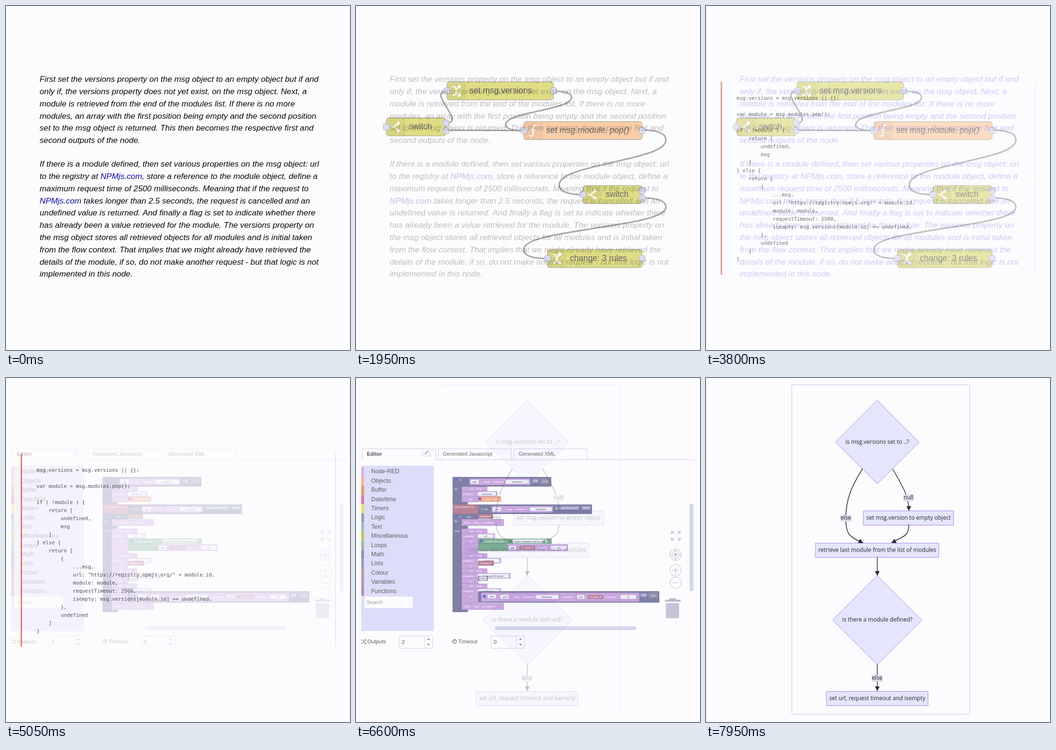
An HTML page with a canvas that plays this animation: 726 by 726 pixels, repeating every 8000 ms.

```html
<!DOCTYPE html>
<html lang="en">
<head>
<meta charset="utf-8">
<title>Five views of one node</title>
<style>
html, body { margin: 0; width: 100%; height: 100%; overflow: hidden; background: #fcfcfe; }
canvas { display: block; width: 726px; height: 726px; }
</style>
</head>
<body>
<canvas id="stage" width="726" height="726"></canvas>
<script>
const SIZE = 726, LOOP = 8000;
const SANS = '"Liberation Sans", Arial, sans-serif';
const MONO = '"DejaVu Sans Mono", monospace';
const HUMAN = '"Open Sans", "Noto Sans", sans-serif';
let c;

function layer(draw) {
  const cv = document.createElement('canvas');
  cv.width = cv.height = SIZE;
  c = cv.getContext('2d');
  c.lineCap = c.lineJoin = 'round';
  draw();
  return cv;
}
function text(s, x, y, font, color, align = 'left', base = 'middle') {
  c.font = font;
  c.fillStyle = color;
  c.textAlign = align;
  c.textBaseline = base;
  c.fillText(s, x, y);
}
function box(x, y, w, h, fill, stroke, r = 0, lw = 1) {
  c.beginPath();
  c.roundRect(x, y, w, h, r);
  if (fill) { c.fillStyle = fill; c.fill(); }
  if (stroke) { c.strokeStyle = stroke; c.lineWidth = lw; c.stroke(); }
}
function path(d, stroke, lw = 1, fill) {
  const p = new Path2D(d);
  if (fill) { c.fillStyle = fill; c.fill(p); }
  if (stroke) { c.strokeStyle = stroke; c.lineWidth = lw; c.stroke(p); }
}
function circle(x, y, r, stroke, fill, lw = 1) {
  c.beginPath();
  c.arc(x, y, r, 0, Math.PI * 2);
  if (fill) { c.fillStyle = fill; c.fill(); }
  if (stroke) { c.strokeStyle = stroke; c.lineWidth = lw; c.stroke(); }
}

// Prose description
const PROSE = [
  'First set the versions property on the msg object to an empty object but if and',
  'only if, the versions property does not yet exist, on the msg object. Next, a',
  'module is retrieved from the end of the modules list. If there is no more',
  'modules, an array with the first position being empty and the second position',
  'set to the msg object is returned. This then becomes the respective first and',
  'second outputs of the node.',
  'If there is a module defined, then set various properties on the msg object: url',
  'to the registry at NPMjs.com, store a reference to the module object, define a',
  'maximum request time of 2500 milliseconds. Meaning that if the request to',
  'NPMjs.com takes longer than 2.5 seconds, the request is cancelled and an',
  'undefined value is returned. And finally a flag is set to indicate whether there',
  'has already been a value retrieved for the module. The versions property on',
  'the msg object stores all retrieved objects for all modules and is initial taken',
  'from the flow context. That implies that we might already have retrieved the',
  'details of the module, if so, do not make another request - but that logic is not',
  'implemented in this node.'
];
function prose(ink, link) {
  const font = 'italic 17.23px ' + SANS;
  PROSE.forEach((line, i) => {
    const y = i < 6 ? 160.2 + i * 25.8 : 339.2 + (i - 6) * 25.8;
    let x = 71;
    for (const part of line.split(/(NPMjs\.com)/)) {
      text(part, x, y, font, part === 'NPMjs.com' ? link : ink, 'left', 'alphabetic');
      x += c.measureText(part).width;
    }
  });
}

// Flow of nodes
const ICONS = {
  split: 'M-9 0H-4C0 0 0-8 7-8M-4 0C0 0 0 8 7 8M4-11L8-8L4-5M4 5L8 8L4 11',
  swap: 'M-8-9H-5C0-9 0 9 5 9H8M-8 9H-5C0 9 0-9 5-9H8M5-12L9-9L5-6M5 6L9 9L5 12',
  func: 'M6-11C1-13 0-8 0-4V5C0 10-2 13-7 11M-5-2H5'
};
function port(x, y) { box(x - 6.5, y - 6.5, 13, 13, '#d3d3ea', '#9696ae', 4); }
function node(x, y, w, label, icon, outs, fill = '#d9d65c', style = '') {
  box(x, y, w, 38, fill, '#a09c80', 6, 1.3);
  box(x + 1, y + 1, 37, 36, 'rgba(0,0,0,.06)', null, 4);
  path(`M${x + 38} ${y}v38`, 'rgba(0,0,0,.15)');
  c.save();
  c.translate(x + 20, y + 19);
  path(ICONS[icon], '#fff', 2.6);
  c.restore();
  text(label, x + 47.5, y + 19.5, style + '17.6px ' + SANS, '#333');
  port(x, y + 19);
  outs.forEach(dy => port(x + w, y + 19 + dy));
}
function wire(x1, y1, x2, y2, e) {
  const dy = y2 - y1, mx = (x1 + x2) / 2, my = (y1 + y2) / 2;
  const lean = (x1 - x2) * 0.3 + 12, a = dy * 0.03, b = dy * 0.15, k = dy * 0.33;
  path(`M${x1} ${y1}C${x1 + e * .55} ${y1} ${x1 + e} ${y1 + a} ${x1 + e} ${y1 + b}
    C${x1 + e} ${y1 + k} ${mx + lean} ${my - dy * .09} ${mx} ${my}
    C${mx - lean} ${my + dy * .09} ${x2 - e} ${y2 - k} ${x2 - e} ${y2 - b}
    C${x2 - e} ${y2 - a} ${x2 - e * .55} ${y2} ${x2} ${y2}`, '#8c8c88', 3.2);
}
function flow() {
  path('M190 247C234 247 148 180 192 180M190 262L354 263', '#8c8c88', 3.2);
  wire(417, 180, 354, 263, 38);
  wire(604, 262, 479, 398, 50);
  wire(604, 405, 404, 533, 50);
  node(192, 160, 225, 'set msg.versions', 'swap', [0]);
  node(64, 236, 126, 'switch', 'split', [-8, 8]);
  node(354, 244, 250, 'set msg.module, pop()', 'func', [0], '#fdc18e', 'italic ');
  node(479, 379, 125, 'switch', 'split', [-8, 8]);
  node(404, 514, 200, 'change: 3 rules', 'swap', [0]);
}

// Code listing
const CODE = `msg.versions = msg.versions || {};

var module = msg.modules.pop();

if ( !module ) {
    return [
        undefined,
        msg
    ]
} else {
    return [
        {
            ...msg,
            url: "https://registry.npmjs.org/" + module.id,
            module: module,
            requestTimeout: 2500,
            isempty: msg.versions[module.id] == undefined,
        },
        undefined
    ]
}`;
function listing() {
  c.setLineDash([1, 2]);
  path('M695.5 160V567', '#b4b4dc');
  c.setLineDash([]);
  box(31, 160, 2.8, 407, '#f4532f');
  CODE.split('\n').forEach((line, i) =>
    text(line, 64.5, 197.7 + i * 17, '10.6px ' + MONO, '#222', 'left', 'alphabetic'));
}

// Block editor
const SLATE = '#5c5f8c', MSG = '#bf94d8', VAR = '#a8627c', GREEN = '#5fa078', FIELD = '#eef0fa';
const TINY = '6px ' + SANS;
function block(x, y, w, h, fill, label = '', dx = 4) {
  box(x, y, w, h, fill, 'rgba(60,50,110,.25)', 1, .7);
  if (label) text(label, x + dx, y + h / 2 + .5, TINY, '#fff');
}
function field(x, y, w, label, fill = FIELD, ink = '#333') {
  box(x, y - 4, w, 8, fill, null, 2);
  text(label, x + w / 2, y + .5, TINY, ink, 'center');
}
function getter(x, y, w, name, fw) {
  block(x, y, w, 14, MSG);
  field(x + 3, y + 7, 17, 'get');
  text('msg', x + 31, y + 7.5, TINY, '#fff');
  text('property', x + 51, y + 7.5, TINY, '#fff');
  field(x + w - fw - 3, y + 7, fw, name);
}
function reader(x, y, w) {
  block(x, y, w, 14, MSG);
  field(x + 3, y + 7, 15, 'get');
  field(x + 25, y + 7, 33, 'module ▾', VAR, '#fff');
  text('property', x + 63, y + 7.5, TINY, '#fff');
  field(x + w - 36, y + 7, 33, 'id');
}
function setter(y, name, w, h = 32) {
  block(223, y, 35, h, MSG);
  block(223, y, 54, 10, MSG, 'set    msg', 16);
  block(223, y + 10, 37 + w, 11, MSG, 'property', 3);
  field(257, y + 15.5, w, name);
  text('to', 240, y + 27, TINY, '#fff');
}
function gear(x, y) { box(x - 3, y - 3, 6, 6, '#3f55c8', null, 1); }
function blocks() {
  block(204, 209, 19, 59, SLATE);
  block(204, 209, 208, 20, SLATE);
  gear(211, 215);
  text('if', 219, 215, TINY, '#fff');
  text('do', 208, 234, TINY, '#fff');
  getter(239, 212, 129, 'versions', 50);
  field(371, 217, 14, '= ▾', '#8c8cc0', '#fff');
  block(388, 211, 22, 13, '#777799', 'null', 6);
  setter(229, 'versions', 38, 33);
  block(204, 262, 32, 5, SLATE);
  block(258, 250, 48, 11, '#f2916c', 'create object', 10);
  gear(261, 255);

  block(204, 267, 55, 20, VAR);
  text('set module ▾ to', 208, 272.5, TINY, '#fff');
  block(258, 267, 240, 20, SLATE, 'in list', 7);
  getter(286, 270, 130, 'modules', 46);
  field(420, 274, 51, 'get and remove ▾', '#8888b4', '#fff');
  field(476, 274, 19, 'last ▾', '#8888b4', '#fff');

  block(204, 287, 19, 207, SLATE);
  block(204, 287, 54, 11, SLATE, 'if       not', 15);
  gear(211, 292);
  block(258, 287, 31, 10, VAR, 'module ▾', 3);
  text('do', 208, 302, TINY, '#fff');
  text('else', 208, 323, TINY, '#fff');
  block(223, 298, 89, 14, MSG, 'send    msg    to output 2', 5);
  block(204, 312, 32, 6, SLATE);

  setter(318, 'url', 33, 52);
  block(258, 339, 155, 11, GREEN, 'create text with', 14);
  gear(264, 344);
  field(331, 344.5, 72, 'https://registry.npmjs.org/');
  block(258, 350, 62, 15, GREEN);
  reader(320, 351, 127);

  setter(370, 'module', 46);
  block(258, 386, 33, 10, VAR, 'module ▾', 3);
  setter(402, 'requestTimeout', 66);
  block(258, 418, 20, 10, SLATE);
  field(260, 423, 16, '2500');
  setter(434, 'isempty', 46, 41);
  block(258, 450, 382, 24, SLATE);
  block(264, 453, 334, 19, MSG);
  gear(271, 461);
  field(278, 461, 17, 'get');
  getter(302, 455, 128, 'versions', 48);
  text('property', 436, 462, TINY, '#fff');
  reader(464, 455, 130);
  field(600, 458, 14, '= ▾', '#8c8cc0', '#fff');
  block(617, 452, 20, 13, '#777799', 'null', 5);
  block(223, 475, 89, 14, MSG, 'send    msg    to output 1', 5);
  block(204, 489, 32, 5, SLATE);
}
const CATEGORIES = [
  ['Node-RED', '#cf9fe4'], ['Objects', '#ff9f85'], ['Buffer', '#e08434'], ['Date/time', '#dd4f9a'],
  ['Timers', '#dddd44'], ['Logic', '#8080a8'], ['Text', '#80b4a8'], ['Miscellaneous', '#b8b832'],
  ['Loops', '#7cae7c'], ['Math', '#7a7aa8'], ['Lists', '#8484ac'], ['Colour', '#a8808c'],
  ['Variables', '#a87c9c'], ['Functions', '#9c78a4']
];
function spinner(x, value) {
  box(x + .5, 544.5, 70, 26, '#fff', '#c4c4e0');
  path(`M${x + 53.5} 544V570`, '#d4d4ea');
  text(value, x + 5.5, 558, '11.5px ' + SANS, '#333');
  path(`M${x + 59} 553l3-4l3 4zM${x + 59} 561l3 4l3-4z`, null, 1, '#777');
}
function editor() {
  const line = '#c4c4e4', label = '11px ' + SANS;
  path('M13.5 172V149.5H168M168.5 149V172.5H714M173.5 172V149.5H328V172M333.5 172V149.5H487.5V172', line);
  text('Editor', 23, 161, 'bold ' + label, '#222');
  text('Generated Javascript', 183, 161, label, '#444');
  text('Generated XML', 343, 161, label, '#444');
  box(141.5, 149.5, 15, 15, '#fff', line);
  path('M146 160L152 154M149 154H152V157M146 157V160H149', '#666');

  box(11, 185, 153, 349, '#d8d8fa');
  CATEGORIES.forEach(([name, color], i) => {
    const y = 198 + i * 19.4;
    box(11, y - 9.5, 6, 19, color);
    text(name, 32, y, '12.3px ' + SANS, '#333');
  });
  box(18, 461, 102, 25, '#fff', '#dcdcf0');
  text('Search', 22, 474, label, '#888');

  path('M11 553H13C16 553 16 560 19 560H21M11 560H13C16 560 16 553 19 553H21M19 551L21 553L19 555M19 558L21 560L19 562', '#444');
  text('Outputs', 24, 556.5, '11.2px ' + SANS, '#333');
  spinner(91, '2');
  circle(208, 556, 4, '#444', null, 1.3);
  path('M208 553V556H206', '#444');
  text('Timeout', 216, 556.5, '11.2px ' + SANS, '#333');
  spinner(285, '0');

  blocks();

  box(704, 265, 8, 185, '#cfcfea', null, 4);
  box(293, 524, 299, 8, '#cfcfea', null, 4);
  const gray = '#a9a9c0';
  path('M666 329V324H671M679 324H684V329M684 337V342H679M671 342H666V337M667 325L671 329M683 325L679 329M683 341L679 337M667 341L671 337', gray, 1.6);
  [373, 406, 432].forEach(y => circle(674.5, y, 12, gray));
  circle(674.5, 373, 7, gray);
  circle(674.5, 373, 3, null, gray);
  path('M674.5 361V366M674.5 380V385M662 373H667M682 373H687M668 406H681M674.5 399.5V412.5M668 432H681', gray, 1.2);
  path('M652 468H685V472H652ZM661 468V465H676V468Z', null, 1, gray);
  box(654, 475, 28, 32, '#b9b9d0', null, 2);
}

// Flow chart
const NODE_FILL = '#e8e9ff', NODE_LINE = '#a384ee', EDGE = '#2c2c3a';
const say = (s, x, y) => text(s, x, y, '12px ' + HUMAN, '#262626', 'center');
function diamond(x, y, r, s) {
  path(`M${x} ${y - r}L${x + r} ${y}L${x} ${y + r}L${x - r} ${y}Z`, NODE_LINE, 1, NODE_FILL);
  say(s, x, y);
}
function step(x, y, w, h, s) {
  box(x + .5, y + .5, w, h, NODE_FILL, NODE_LINE);
  say(s, x + w / 2 + .5, y + h / 2 + .5);
}
function head(x, y, angle) {
  c.save();
  c.translate(x, y);
  c.rotate(angle);
  path('M0 0L-10-5V5Z', null, 1, EDGE);
  c.restore();
}
function tag(s, x, y) {
  const w = s === 'else' ? 23 : 21;
  box(x - w / 2, y - 7, w, 14, '#dedef0');
  say(s, x, y);
}
function chart() {
  box(181.5, 14.5, 375, 695, null, '#cfc3f2');
  diamond(361.5, 135.5, 88, 'is msg.versions set to ..?');
  step(332, 280, 190, 30, 'set msg.version to empty object');
  step(231, 348, 260, 30, 'retrieve last module from the list of modules');
  diamond(361.5, 511, 94, 'is there a module defined?');
  step(254, 661, 214, 30, 'set url, request timeout and isempty');
  path('M330 192C308 228 295 255 295 296C295 328 302 335 325 345M394 192C412 224 427 247 427.5 272' +
    'M428 310C428 330 422 333 398 344M361.5 379V409M361.5 605V653', EDGE, 1.5);
  head(332, 348, .45);
  head(428, 280.5, Math.PI / 2);
  head(391, 348, Math.PI - .45);
  head(361.5, 417.5, Math.PI / 2);
  head(361.5, 661, Math.PI / 2);
  tag('null', 427.5, 253);
  tag('else', 295, 296);
  tag('else', 361, 634);
}

// Each slide: a layer and its opacity as [time, alpha] keys
const SLIDES = [
  [() => prose('#cdcdff', '#cdcdff'), [[1950, 0], [2600, 1], [3850, 1], [4250, 0]]],
  [() => prose('#080808', '#0a0ab4'), [[850, 1], [1950, .25], [2600, 0]]],
  [flow, [[1150, 0], [1950, .75], [2600, 1], [2850, 1], [3800, .52], [4300, 0]]],
  [listing, [[2850, 0], [3800, .64], [4300, 1], [4550, 1], [5050, .78], [5750, .32], [6000, 0]]],
  [editor, [[4550, 0], [5050, .24], [5750, .8], [6000, 1], [6250, 1], [7150, .45], [7700, 0]]],
  [chart, [[6250, 0], [7150, .7], [7700, 1]]]
].map(([draw, keys]) => ({ image: layer(draw), keys }));

function alphaAt(keys, t) {
  if (t <= keys[0][0]) return keys[0][1];
  for (let i = 1; i < keys.length; i++) {
    const [t0, a0] = keys[i - 1], [t1, a1] = keys[i];
    if (t < t1) return a0 + (a1 - a0) * (t - t0) / (t1 - t0);
  }
  return keys[keys.length - 1][1];
}

const view = document.getElementById('stage').getContext('2d');
const start = performance.now();
function frame() {
  const t = (performance.now() - start) % LOOP;
  view.globalAlpha = 1;
  view.globalCompositeOperation = 'source-over';
  view.fillStyle = '#fcfcfe';
  view.fillRect(0, 0, SIZE, SIZE);
  // Multiply keeps both slides readable where they overlap
  view.globalCompositeOperation = 'multiply';
  for (const { image, keys } of SLIDES) {
    view.globalAlpha = alphaAt(keys, t);
    if (view.globalAlpha > 0) view.drawImage(image, 0, 0);
  }
  requestAnimationFrame(frame);
}
frame();
</script>
</body>
</html>
```
